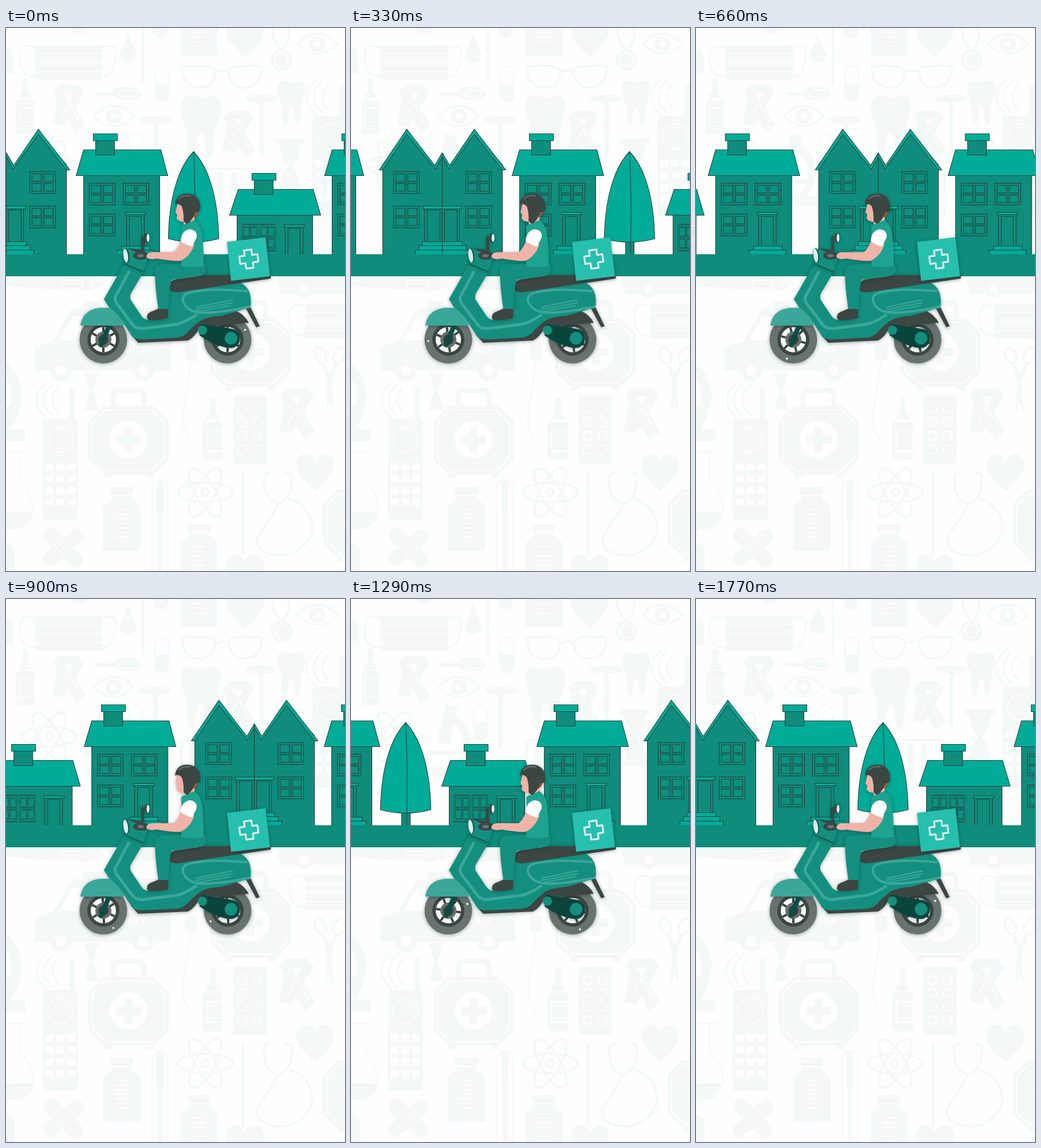
Animation, 592 px wide and 947 px high, one loop 1800 ms. Source, as an HTML page:

```html
<!DOCTYPE html>
<html lang="en">
<head>
<meta charset="utf-8">
<title>Scooter delivery</title>
<style>
  html, body { margin: 0; width: 100%; height: 100%; overflow: hidden; background: #fff; }
  svg { display: block; width: 100vw; height: 100vh; }
  .pattern { fill: #f4f8f7; }
  .line { fill: none; stroke: #f4f8f7; stroke-width: 4; stroke-linecap: round; }
  .gap { fill: #fefefe; }
  .cut { fill: none; stroke: #fefefe; stroke-width: 2; }
  .town { stroke: #25443f; stroke-width: 1.1; }
  .wall { fill: #0f8c7c; }
  .roof { fill: #00ab98; }
  .pane { fill: #0c9080; }
  .dark { fill: #3c4643; }
  .teal { fill: #148f7f; }
  .skin { fill: #f0b3a8; }
  .shade { filter: drop-shadow(0 1px 3px rgba(0, 30, 25, .38)); }
</style>
</head>
<body>
<svg viewBox="0 0 592 947" preserveAspectRatio="none">
  <defs>
    <g id="ribbon">
      <path d="M-17-42L17-42 27-29-9 31-28 26Z"/>
      <path d="M-17-42L-27-29 12 42 29 28 9-5Z"/>
      <path class="gap" d="M-9-28L9-28 0-13Z"/>
      <path class="cut" d="M0-11L-14 16M0-11L18 22"/>
    </g>
    <g id="kit">
      <path class="line" d="M-27-50V-70Q-27-81-18-81H18Q27-81 27-70V-50" style="stroke-width:9"/>
      <path d="M-43-54H43L70-28V40L43 66H-43L-70 40V-28Z"/>
      <path class="cut" d="M-40-47H40L63-25V37L40 59H-40L-63 37V-25Z"/>
      <circle class="gap" cy="5" r="33"/>
      <path d="M-7-17H7V-2H22V12H7V27H-7V12H-22V-2H-7Z"/>
      <path d="M-43 64h13v8h-13zM30 64h13v8H30z"/>
    </g>
    <g id="phone">
      <rect x="-31" y="-88" width="62" height="176" rx="6"/>
      <rect x="16" y="-143" width="10" height="60" rx="4"/>
      <circle class="cut" cy="-52" r="22"/>
      <path class="line" d="M-3-143q-22 22 0 44M-14-149q-30 28 0 56M-25-151q-34 30 0 60" style="stroke-width:3"/>
      <path d="M-26-5H27M-26 16H27M-26 37H27M-26 57H27" stroke="#fefefe" stroke-width="12" stroke-dasharray="14 5"/>
    </g>
    <g id="dropper">
      <path d="M-5-48Q0-52 5-48V-23H10V-14H-10V-23H-5Z"/>
      <rect x="-16" y="-12" width="32" height="60" rx="5"/>
      <path class="cut" d="M-10 2H16V34H-10Z"/>
    </g>
    <g id="jar">
      <path d="M-20-56H20V-43H16Q15-32 25-29Q33-25 33-16V50Q33 56 27 56H-27Q-33 56-33 50V-16Q-33-25-25-29Q-15-32-16-43H-20Z"/>
      <path class="cut" d="M-17-41H17M-12-16H12M-8-8H8M-12 0H12M-8 8H8M-12 16H12M-8 24H8M-12 32H12"/>
    </g>
    <g id="heart"><path d="M0 34C-18 14-33 4-33-14C-33-35-8-39 0-19C8-39 33-35 33-14C33 4 18 14 0 34Z"/></g>
    <g id="eye">
      <path class="line" d="M-35 0Q0-34 35 0Q0 34-35 0Z" style="stroke-width:3"/>
      <circle r="14"/><circle class="gap" r="6"/>
      <path class="line" d="M-29-11Q0-28 29-11" style="stroke-width:2"/>
    </g>
    <g id="tooth"><path d="M-35-38C-34-60-14-56 0-50C14-56 34-60 35-38C37-18 25-8 25 12Q25 52 14 55C6 56 10 13 0 9C-10 13-6 56-14 55Q-25 52-25 12C-25-8-37-18-35-38Z"/></g>
    <g id="atom" class="line">
      <ellipse rx="48" ry="17"/><ellipse rx="48" ry="17" transform="rotate(60)"/>
      <ellipse rx="48" ry="17" transform="rotate(120)"/><circle r="6"/>
    </g>
    <g id="hourglass"><path d="M-13-33H13V-27H9Q9-11 2 0Q9 11 9 27H13V33H-13V27H-9Q-9 11-2 0Q-9-11-9-27H-13Z"/></g>
    <g id="mask">
      <rect x="-59" y="-30" width="118" height="60" rx="3"/>
      <path class="cut" d="M-59-16H59M-59 0H59M-59 16H59"/>
      <path class="line" d="M-59-26Q-90-38-86 0Q-82 28-59 24M59-26Q90-38 80 0Q74 28 59 24" style="stroke-width:3"/>
    </g>
    <g id="scope">
      <path d="M-14-60L6-54 -8 10-30 4Z"/>
      <path class="line" d="M2-34Q40 0 8 48" style="stroke-width:13"/>
      <path d="M-44 20H14V28H-44ZM-40 50H34V66H-40Z"/>
    </g>
    <g id="capsule">
      <rect class="line" x="-12" y="-31" width="24" height="62" rx="12" style="stroke-width:2"/>
      <path d="M-12 0H12V20A12 12 0 0 1-12 20Z"/>
    </g>
    <g id="reflex"><ellipse rx="29" ry="7"/><rect x="-4" width="8" height="100" rx="3"/></g>

    <g id="window">
      <rect class="wall" width="45" height="38"/>
      <path class="pane" d="M4 4H20V17H4ZM25 4H41V17H25ZM4 21H20V34H4ZM25 21H41V34H25Z"/>
      <path d="M0 19H45M22.5 0V38" fill="none" stroke-width=".6"/>
    </g>
    <g id="chimney">
      <path class="wall" d="M4 12H37V37H4Z"/><path class="roof" d="M0 0H42V12H0Z"/>
    </g>
    <g id="door">
      <path class="wall" d="M2 3H33V59H2ZM7 7H28V59H7Z"/>
      <path class="roof" d="M0 0H36V4H0Z"/>
    </g>
    <g id="tall">
      <path class="wall" d="M13 257H146V395H13Z"/>
      <path class="roof" d="M13 212H148L160 257H0Z"/>
      <use href="#chimney" x="30" y="184"/>
      <use href="#window" x="23" y="270"/><use href="#window" x="82" y="270"/><use href="#window" x="23" y="324"/>
      <use href="#door" x="86" y="321"/>
      <path class="roof" d="M79 380H129V387H79ZM72 387H136V395H72Z"/>
    </g>
    <g id="cottage">
      <path class="wall" d="M13 326H145V395H13Z"/>
      <path class="roof" d="M15 281H146L159 326H0Z"/>
      <use href="#chimney" x="39" y="253"/>
      <use href="#window" transform="translate(22 342) scale(.6 1.21)"/>
      <use href="#window" transform="translate(53 342) scale(.6 1.21)"/>
      <path class="wall" d="M97 346H128V395H97ZM102 349H123V395H102Z"/>
      <path class="roof" d="M95 343H131V347H95Z"/>
    </g>
    <g id="twin">
      <path class="wall" d="M6 247V238L48 183 98 243 110 222 122 243 166 183 215 238V395H6Z"/>
      <path class="roof" d="M0 247L48 176 97 239 110 217 123 239 166 176 221 247H215L166 185 122 246 110 224 98 246 48 185 6 247Z"/>
      <use href="#window" x="25" y="250"/><use href="#window" x="151" y="250"/>
      <use href="#window" x="25" y="310"/><use href="#window" x="151" y="310"/>
      <path class="wall" d="M79 314H140V372H79ZM84 317H106V372H84ZM114 317H136V372H114Z"/>
      <path class="roof" d="M76 310H144V315H76ZM75 372H145V379H75ZM69 379H152V387H69ZM63 387H158V395H63Z"/>
      <path d="M110 217V395"/>
    </g>
    <g id="tree">
      <path class="wall" d="M-7 370H8V397H-7Z"/>
      <path class="roof" d="M0 215C-29 245-43 302-44 367Q0 379 44 367C43 302 29 245 0 215Z"/>
      <path d="M0 215Q4 300 2 373V397" fill="none"/>
    </g>
    <g id="block">
      <use href="#twin"/><use href="#tall" x="232"/><use href="#tree" x="437"/>
      <use href="#cottage" x="500"/><use href="#tall" x="666"/>
    </g>
    <g id="wheel">
      <circle r="34.5" fill="none" stroke="#68726f" stroke-width="14"/>
      <circle r="25" fill="none" stroke="#3b4643" stroke-width="6"/>
      <circle r="22" fill="#f8fbfa"/>
      <path d="M0-22V22M-19-11L19 11M19-11L-19 11" stroke="#3b4643" stroke-width="4"/>
      <circle r="14" fill="#68726f"/><circle r="9" fill="#3b4643"/>
    </g>
  </defs>

  <rect width="592" height="947" fill="#fefefe"/>

  <g class="pattern">
    <use href="#mask" x="110" y="60"/><use href="#mask" x="581" y="512"/>
    <path d="M0 35H8L14 52V80H0ZM113 0H143L136 9H120Z"/>
    <path d="M213 8Q218 26 228 46A15 15 0 1 1 198 46Q209 26 213 8Z"/>
    <path class="line" d="M239 0V86M239 84V95"/>
    <use href="#capsule" x="272" y="97"/><use href="#capsule" x="270" y="-14"/><use href="#capsule" x="226" y="216"/>
    <use href="#jar" x="337" y="-8"/><use href="#jar" x="202" y="856"/><use href="#jar" x="337" y="921"/><use href="#jar" x="-18" y="930"/>
    <use href="#heart" x="417" y="18"/><use href="#heart" x="540" y="775"/><use href="#heart" x="417" y="950"/>
    <path class="line" d="M465 0Q464 22 480 37M492 0Q500 17 485 36"/>
    <circle cx="481" cy="56" r="19"/><circle class="cut" cx="481" cy="56" r="12"/>
    <use href="#eye" x="544" y="28"/><use href="#eye" x="188" y="154"/>
    <path class="line" d="M305 70Q311 64 337 66Q366 66 365 78Q363 104 338 104Q309 102 308 74M389 78Q388 66 416 66Q443 64 449 70M389 78Q392 104 417 104Q443 102 446 74M365 78Q377 70 389 78"/>
    <use href="#dropper" x="34" y="137"/><use href="#dropper" transform="translate(361 700) scale(1.12)"/>
    <use href="#ribbon" x="110" y="141"/><use href="#ribbon" x="406" y="186"/><use href="#ribbon" transform="translate(508 673) scale(1.1)"/>
    <path d="M153 114Q160 109 184 113Q194 99 220 103Q235 108 235 116Q232 126 213 126Q193 125 184 117Q160 120 153 114Z"/>
    <ellipse class="cut" cx="213" cy="115" rx="15" ry="7"/>
    <use href="#reflex" x="261" y="160"/><use href="#reflex" x="446" y="123"/>
    <use href="#tooth" x="340" y="173"/><use href="#tooth" transform="translate(498 131) scale(.7)"/>
    <use href="#phone" x="566" y="241"/><use href="#phone" x="95" y="770"/>
    <use href="#atom" x="75" y="240"/><use href="#atom" x="348" y="810"/>
    <use href="#scope" x="180" y="244"/><use href="#scope" transform="translate(-12 632) scale(1.35)"/>
    <use href="#hourglass" transform="translate(496 242) scale(2 1.5)"/><use href="#hourglass" x="149" y="633"/>
    <rect class="line" x="306" y="246" width="128" height="82" rx="6"/>
    <path class="line" d="M326 256V310M350 256V310M374 256V310M398 256V310" style="stroke-width:11"/>
    <path d="M0 433H150Q170 438 171 447Q165 458 140 458L65 455 0 449Z"/>
    <rect class="cut" x="98" y="440" width="36" height="14" rx="3"/><circle class="cut" cx="157" cy="448" r="8"/>
    <path d="M175 433H292V457H190ZM470 433H592V463H480Z"/>
    <circle cx="520" cy="455" r="16"/><circle class="gap" cx="520" cy="455" r="8"/>
    <path d="M50 598V557L82 546 111 497Q114 489 126 488H287V598Z"/>
    <path class="gap" d="M92 544L116 503H137V544Z"/>
    <path d="M135 476H164V488H135Z"/>
    <circle cx="96" cy="597" r="19"/><circle cx="240" cy="597" r="19"/>
    <circle class="gap" cx="96" cy="597" r="9"/><circle class="gap" cx="240" cy="597" r="9"/>
    <text class="gap" x="145" y="567" font-family="Lato, Arial, sans-serif" font-weight="900" font-style="italic" font-size="17">AMBULANCE</text>
    <use href="#kit" x="214" y="713"/><use href="#kit" x="427" y="560"/><use href="#kit" x="623" y="858"/>
    <path class="line" d="M322 552V578C322 625 300 676 313 704Q321 724 328 725" style="stroke-width:2"/>
    <path d="M312 552H334V580H312Z"/>
    <rect x="397" y="641" width="58" height="119" rx="4"/>
    <g class="cut"><circle cx="413" cy="664" r="8"/><circle cx="439" cy="664" r="8"/><circle cx="413" cy="687" r="8"/><circle cx="439" cy="687" r="8"/><circle cx="413" cy="711" r="8"/><circle cx="439" cy="711" r="8"/><circle cx="413" cy="735" r="8"/><circle cx="439" cy="735" r="8"/></g>
    <ellipse class="line" cx="549" cy="571" rx="9" ry="15" transform="rotate(-25 549 571)"/>
    <ellipse class="line" cx="582" cy="571" rx="9" ry="15" transform="rotate(25 582 571)"/>
    <path d="M555 584L565 602 576 584 579 587 569 617 572 674 565 650 558 674 561 617 552 588Z"/>
    <path class="line" d="M414 775V918M452 778Q446 823 475 829Q501 825 499 778M475 829C461 868 421 890 447 911C488 936 530 905 535 876C536 849 517 826 494 821M452 778L461 775M499 778L489 775"/>
    <rect class="line" x="255" y="789" width="28" height="170" rx="13" style="stroke-width:2"/>
    <path d="M263 788H275V850H263ZM265 850H273V947H265Z"/>
    <path class="line" d="M0 740H32M24 742V790Q48 810 47 841Q44 869 17 873H0" style="stroke-width:2"/>
    <path d="M0 845H47Q40 873 17 873H0Z"/>
    <g transform="translate(100 906)">
      <rect x="-43" y="-13" width="86" height="26" rx="12" transform="rotate(45)"/>
      <g transform="rotate(-40)"><rect x="-43" y="-13" width="86" height="26" rx="12" stroke="#fefefe"/><path d="M-10-7H12M-10 0H12M-10 7H12" stroke="#fefefe" stroke-width="3" stroke-dasharray="3 6"/></g>
    </g>
  </g>

  <g class="town" transform="translate(.5 .5)">
    <g id="street"><use href="#block" x="-853"/><use href="#block"/></g>
  </g>
  <rect class="wall" y="394.5" width="592" height="38.5"/>

  <g class="shade">
    <g id="rear"><use href="#wheel"/></g>
    <g id="front"><use href="#wheel"/></g>
    <circle id="rearDot" r="1.8" fill="#fff"/>
    <circle id="frontDot" r="1.8" fill="#fff"/>
  </g>

  <g class="shade">
    <path d="M181 517L166 552" stroke="#0b4d43" stroke-width="8" stroke-linecap="round"/>
    <path d="M130 519C132 501 145 489 166 488L190 488Q202 500 206 519Z" fill="#3ba79a"/>
    <path class="dark" d="M218 535L231 549 318 545Q331 538 338 522L424 514Q416 500 403 494L340 500Z"/>
    <path class="dark" d="M418 487H427L443 520 437 522Z"/>
    <path d="M341 516L397 525A17 17 0 0 1 394 558Q368 557 338 536Z" fill="#0a453c"/>
    <circle class="teal" cx="343" cy="527" r="8"/><circle class="teal" cx="393" cy="541" r="11"/>
    <path class="teal" d="M210 405L171 473 180 487Q198 500 210 522L221 539Q227 543 238 543L300 540Q313 538 322 525L337 512Q350 503 376 502L427 487Q430 463 419 451L405 440 280 455V507Q262 510 247 509Q240 508 235 500L219 476Q215 470 218 463L241 424Z"/>
    <path d="M215 424L191 469Q189 474 193 480L220 516Q226 525 240 524L296 517Q310 515 333 500" fill="none" stroke="#3ba79a" stroke-width="5"/>
    <path d="M422 459Q354 453 323 461Q307 464 309 476Q315 493 336 496Q360 499 427 486" fill="none" stroke="#3ba79a" stroke-width="4"/>
    <path d="M332 487L396 474M331 491L396 479M333 495L392 484" fill="none" stroke="#3ba79a" stroke-width="2"/>
    <path class="dark" d="M285 449Q286 440 298 438L350 431H460Q464 433 462 437L300 461Q283 462 285 449Z"/>
  </g>

  <g class="shade">
    <path d="M386 373L453 365 461 433 393 441Z" fill="#27bfae"/>
    <path d="M-6.5-16H6.5V-6.5H16V6.5H6.5V16H-6.5V6.5H-16V-6.5H-6.5Z" transform="translate(424 403) rotate(-7)" fill="none" stroke="#e5f6f3" stroke-width="3" stroke-linejoin="round"/>
  </g>

  <g class="shade">
    <path class="dark" d="M236 396V369M236 366Q237 361 240 363L242 395H236Z"/>
    <ellipse class="dark" cx="246" cy="366" rx="4.5" ry="8"/><ellipse cx="248" cy="366" rx="2.5" ry="7" fill="#dceeea"/>
    <path class="teal" d="M213 384L249 397 240 425 207 411Z"/>
    <path d="M207 411L240 425" stroke="#0b5c50" stroke-width="1.5"/>
    <path class="dark" d="M212 384L236 387 251 397 243 398Z"/>
    <ellipse class="dark" cx="235" cy="397" rx="13" ry="7"/>
    <ellipse cx="235" cy="397" rx="6" ry="3" fill="#687572"/>
    <ellipse cx="210" cy="397" rx="5.5" ry="13" transform="rotate(-8 210 397)" fill="#0b5c50"/>
    <ellipse cx="209" cy="397" rx="4" ry="12" transform="rotate(-8 209 397)" fill="#dcefec"/>
  </g>

  <g class="shade">
    <path class="dark" d="M246 505Q246 496 258 493L267 489H283V506Q265 511 248 509Z"/>
    <path class="teal" d="M260 421Q261 413 276 412L347 411Q353 427 341 432L290 439Q285 448 284 490H266Q260 451 260 421Z"/>
    <path class="skin" d="M309 325L331 320Q328 334 331 342L311 348Z"/>
    <path d="M306 345Q316 340 329 335Q342 344 343 366Q346 394 345 415Q326 419 306 415L307 385Z" fill="#1da390"/>
    <path class="skin" d="M306 371L329 377Q323 397 305 406Q290 407 263 402Q249 405 245 399Q246 390 258 391L293 391Q299 387 306 371Z"/>
    <path d="M305 372Q306 353 321 351Q334 352 333 365L325 381Q315 379 305 372Z" fill="#fff"/>
    <path class="skin" d="M300 304L296 321Q297 324 299 325L298 332Q301 338 312 338L321 328 320 304Z"/>
    <path d="M323 317H336Q335 326 327 331Z" fill="#b9502b"/>
    <path class="dark" d="M295 308C297 293 306 288 318 289C333 290 341 301 339 316Q338 322 331 321Q326 334 318 341 313 342 310 336Q311 323 307 311Q301 305 295 308Z"/>
    <path d="M302 298Q310 290 322 293" fill="none" stroke="#69716f" stroke-width="2" stroke-linecap="round"/>
  </g>
</svg>
<script>
  const LOOP = 1800, STEP = 30, LAST = LOOP / STEP - 1;
  const PERIOD = 853, START = -110;
  const get = id => document.getElementById(id);
  const wheels = [
    { name: 'front', x: 170, y: 543.5, phase: 243 },
    { name: 'rear', x: 387, y: 543.5, phase: -29 }
  ];

  function draw(time) {
    const step = Math.floor((time % LOOP) / STEP);
    const turn = -360 * step / LAST;
    const shift = (START + (PERIOD - 1) * step / LAST + PERIOD) % PERIOD;
    get('street').setAttribute('transform', `translate(${shift})`);

    for (const { name, x, y, phase } of wheels) {
      const angle = (phase + turn) * Math.PI / 180;
      get(name).setAttribute('transform', `translate(${x} ${y}) rotate(${turn})`);
      get(name + 'Dot').setAttribute('cx', x + 35 * Math.cos(angle));
      get(name + 'Dot').setAttribute('cy', y + 35 * Math.sin(angle));
    }
  }

  let began;
  function tick(now) {
    began ??= now;
    draw(now - began);
    requestAnimationFrame(tick);
  }
  draw(0);
  requestAnimationFrame(tick);
</script>
</body>
</html>
```
